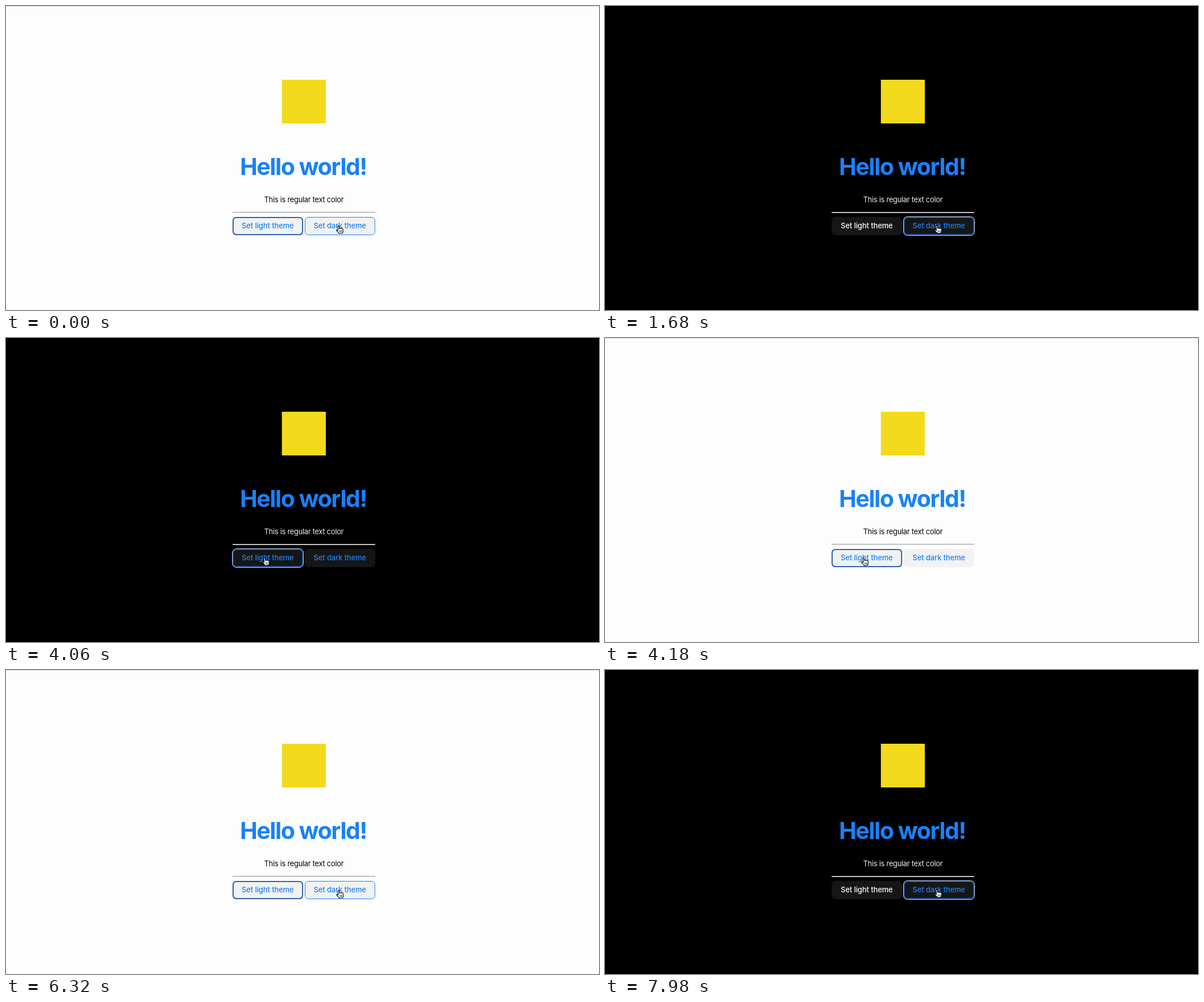
An HTML page for the animation above (8 s loop, 1044x536 px).

```html
<!DOCTYPE html>
<html lang="en">
<head>
<meta charset="utf-8">
<title>Theme switch</title>
<style>
  html, body { margin: 0; width: 100%; height: 100%; overflow: hidden; }
  svg { display: block; width: 1044px; height: 536px; background: var(--page); }
  svg { --page: #fdfdfd; --ink: #000; --face: #f1f2f1; --ring: #1551a8; --halo: none; --accent: #1a81fa; }
  svg.dark { --page: #000; --ink: #f0f0f0; --face: #161616; --ring: #1d6fe0; --halo: #c4dcfc; }
  text { font: 400 12.87px Inter, sans-serif; font-optical-sizing: none; letter-spacing: -.02em; text-anchor: middle; fill: var(--ink); }
  .title { font-size: 41.2px; font-weight: 700; letter-spacing: -.036em; fill: var(--accent); }
  .label { font-weight: 450; letter-spacing: -.004em; fill: var(--accent); }
  .face { fill: var(--face); }
  .edge, .ring, .halo { fill: none; }
  .edge { stroke: var(--accent); }
  .ring { stroke: var(--ring); stroke-width: 1.8; }
  .halo { stroke: var(--halo); }
  .dark .ring { stroke-width: 1.2; }
  .dark .top { display: none; }
</style>
</head>
<body>
<svg id="stage" viewBox="0 0 1044 536">
  <rect class="top" width="1044" height="1" fill="#d5d5d5"/>
  <rect x="485.7" y="130" width="77.4" height="77" fill="#f4da1d"/>
  <text class="title" x="523.5" y="297.5">Hello world!</text>
  <text x="524.4" y="346">This is regular text color</text>
  <rect x="399" y="363" width="251" height="1" fill="#9a9a9a"/>
  <rect x="399" y="364" width="251" height="1" fill="#eee"/>
  <g id="buttons"></g>
  <g id="cursor" stroke="#000" stroke-linecap="round" stroke-linejoin="round">
    <g transform="rotate(-7)">
      <path fill="#fff" stroke-width="1.1" d="M-3.5 1.5V-5.6a1.2 1.2 0 0 1 2.4 0V-1.8c.3-.8 2-.7 2.2.2 .4-.7 1.9-.5 2 .4 .5-.6 2-.3 2 .8V3c0 2-1.2 2.6-1.2 4H-2.4c0-1.4-3.4-4-4-6 -.3-1.2 1.2-1.6 2-.5z"/>
      <path fill="none" stroke-width=".7" d="M-.9 2.2v2.6M.9 2.2v2.6M2.7 2.2v2.6"/>
    </g>
  </g>
</svg>
<script>
const LOOP = 8000, FADE = 250;
const stage = document.getElementById('stage');
const cursor = document.getElementById('cursor');

// Time spans in ms
const darkSpans = [[380, 4080], [7740, LOOP]];
const whiteLabelSpans = [[380, 2290], [7740, LOOP]];
const pathX = [[0, 588], [300, 587], [2000, 587], [2500, 469], [3000, 458], [4700, 458], [5480, 588], [7680, 589], [7980, 587]];
const pathY = [[0, 394], [300, 393], [2000, 394], [2500, 397], [3000, 394], [4700, 394], [5150, 401], [5250, 401], [5700, 395], [7680, 395], [7980, 394]];

const within = (spans, t) => spans.some(([from, to]) => t >= from && t < to);
const clamp = v => Math.min(1, Math.max(0, v));
const smooth = u => u * u * (3 - 2 * u);

function along(keys, t) {
  const next = keys.findIndex(([time]) => time > t);
  if (next < 0) return keys[keys.length - 1][1];
  const [t0, a] = keys[next - 1], [t1, b] = keys[next];
  return a + (b - a) * smooth((t - t0) / (t1 - t0));
}

function fade(spans, t) {
  return Math.max(...spans.map(([from, to]) =>
    Math.min(smooth(clamp((t - from) / FADE)), 1 - smooth(clamp((t - to) / FADE)))));
}

function makeButton(x, name, focus, hover) {
  const group = document.createElementNS('http://www.w3.org/2000/svg', 'g');
  group.setAttribute('transform', `translate(${x} 372)`);
  group.innerHTML = `
    <rect class="face" width="124" height="32" rx="6.5"/>
    <rect class="edge" x=".5" y=".5" width="123" height="31" rx="6"/>
    <g class="focus">
      <rect class="ring" x=".8" y=".8" width="122.4" height="30.4" rx="5.8"/>
      <rect class="halo" x="-.5" y="-.5" width="125" height="33" rx="7"/>
    </g>
    <text class="label" x="61.8" y="20.3">${name}</text>`;
  document.getElementById('buttons').append(group);
  const [edge, ring, label] = ['.edge', '.focus', '.label'].map(s => group.querySelector(s));
  return { edge, ring, label, focus, hover };
}

const buttons = [
  makeButton(399, 'Set light theme', [[0, 120], [3840, 7420]], [[2290, 5080]]),
  makeButton(526, 'Set dark theme', [[120, 3840], [7420, LOOP]], [[-FADE, 2250], [5100, LOOP]]),
];

function draw(t) {
  stage.classList.toggle('dark', within(darkSpans, t));
  for (const { edge, ring, focus, hover } of buttons) {
    const focused = within(focus, t);
    ring.style.display = focused ? '' : 'none';
    edge.style.opacity = focused ? 0 : fade(hover, t);
  }
  buttons[0].label.style.fill = within(whiteLabelSpans, t) ? '#fff' : '';
  cursor.setAttribute('transform', `translate(${along(pathX, t)} ${along(pathY, t)})`);
}

function tick() {
  draw(performance.now() % LOOP);
  requestAnimationFrame(tick);
}
tick();
</script>
</body>
</html>
```
